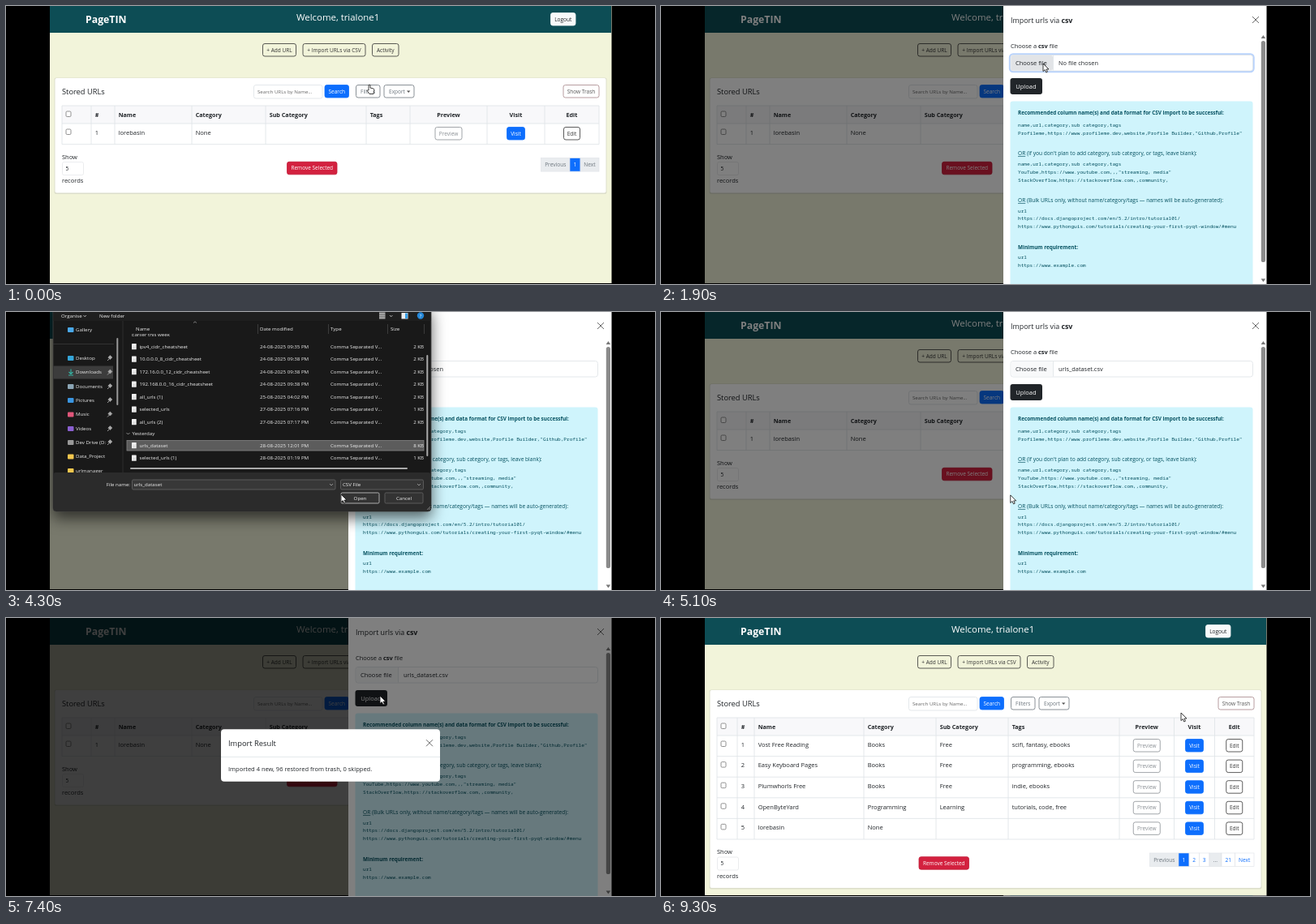
Animation, 800 px wide and 343 px high, one loop 9.4 s. Source, as an HTML page:

```html
<!DOCTYPE html>
<html lang="en">
<head>
<meta charset="utf-8">
<style>
html, body { margin: 0; width: 100%; height: 100%; overflow: hidden; background: #000; }
svg { display: block; }
text { font-family: "Open Sans", "Noto Sans", sans-serif; white-space: pre; }
.mono { font-family: "Noto Sans Mono", "DejaVu Sans Mono", monospace; }
.shadow { filter: drop-shadow(0 8px 9px rgba(0, 0, 0, .6)); }
</style>
</head>
<body>
<svg id="stage" width="800" height="343" viewBox="0 0 800 343"></svg>
<script>
const LOOP = 9400, STEP = 100;
const BLUE = '#0d6efd', INK = '#212529', GRAY = '#6c757d';

// text is placed by its vertical middle
const text = (x, cy, str, size = 7.5, fill = INK, extra = '') =>
  `<text x="${x}" y="${(cy + size * .36).toFixed(2)}" font-size="${size}" fill="${fill}" ${extra}>${str}</text>`;
const bold = (x, cy, str, size = 7.2, fill = INK, extra = '') =>
  text(x, cy, str, size, fill, 'font-weight="700" ' + extra);
const box = (x1, y1, x2, y2, fill = 'none', stroke = 'none', r = 0, extra = '') =>
  `<rect x="${x1}" y="${y1}" width="${x2 - x1}" height="${y2 - y1}" rx="${r}" fill="${fill}" stroke="${stroke}" ${extra}/>`;
const path = (d, stroke, width = 1, fill = 'none') =>
  `<path d="${d}" fill="${fill}" stroke="${stroke}" stroke-width="${width}"/>`;
const group = (id, content) => `<g id="${id}">${content}</g>`;
const MID = 'text-anchor="middle"', END = 'text-anchor="end"';
const button = (x1, y1, x2, label, color, fill = 'none', stroke = color, h = 16.5) =>
  box(x1 + .5, y1 + .5, x2 - .5, y1 + h - .5, fill, stroke, 2.5, 'stroke-width=".8"') +
  text((x1 + x2) / 2, y1 + h / 2, label, 6.5, color, MID);
const cross = (x, y) => path(`M${x - 4} ${y - 4}l8 8m0-8l-8 8`, '#6a6a6a', 1);
const checkbox = y => box(74, y - 4, 80, y + 2.5, '#fff', '#777', 1.3, 'stroke-width=".8"');

function page({ edges, rows, removeX, pager }) {
  const bottom = 145 + 25.6 * rows.length;
  const titles = ['', '#', 'Name', 'Category', 'Sub Category', 'Tags', 'Preview', 'Visit', 'Edit'];
  const mid = i => (edges[i] + edges[i + 1]) / 2;
  let s = box(54, 0, 747, 342, '#f2f4da') + box(54, 0, 746, 33, '#0d4d55') +
    bold(98, 16.5, 'PageTIN', 12.3, '#fff') + text(358, 14, 'Welcome, trialone1', 11.4, '#fff') +
    button(671, 8, 702.5, 'Logout', INK, '#f8f9fa', '#f8f9fa') +
    button(316, 46, 358, '+ Add URL', '#333') +
    button(365.5, 46, 443.5, '+ Import URLs via CSV', '#333') +
    button(451, 46, 484.5, 'Activity', '#333');
  s += box(59.5, 88.5, 740.5, bottom + 61.5, '#dcdecb', 'none', 2) +
    box(60.5, 89, 739.5, bottom + 60, '#fff', 'none', 2) +
    text(69, 106, 'Stored URLs', 9.3) +
    box(305.5, 97.5, 390, 114, '#fff', '#dee2e6', 2.5, 'stroke-width=".8"') +
    text(310, 106, 'Search URLs by Name...', 6.15, '#666') +
    button(392.5, 97, 423, 'Search', '#fff', BLUE, BLUE) +
    button(431, 97, 461.5, 'Filters', GRAY) +
    button(465.5, 97, 503.5, 'Export   ', GRAY) + path('M494 104.5h4.4l-2.2 2.4z', 'none', 0, '#555') +
    button(686.5, 97, 731.5, 'Show Trash', '#555', 'none', '#a58488');
  s += box(69, 123, 731, 145, '#f8f8fa');
  const lines = edges.map(x => `M${x} 123V${bottom}`).join('') +
    [123, 145, ...rows.map((_, i) => 170.6 + i * 25.6)].map(y => `M69 ${y}H731`).join('');
  s += path(lines, '#dee2e6', .8) + checkbox(134);
  titles.forEach((t, i) => s += i < 6 ? bold(edges[i] + 4.7, 134, t) : bold(mid(i), 134, t, 7.2, INK, MID));
  rows.forEach((cells, r) => {
    const cy = 156 + r * 25.6, top = cy - 7;
    s += checkbox(cy);
    [r + 1, ...cells].forEach((c, i) => s += text(edges[i + 1] + 4.7, cy, c));
    s += button(mid(6) - 17, top, mid(6) + 17, 'Preview', '#8a8f94') +
      button(mid(7) - 11.5, top, mid(7) + 11.5, 'Visit', '#fff', BLUE, BLUE) +
      button(mid(8) - 10.5, top, mid(8) + 10.5, 'Edit', '#333');
  });
  s += text(69, bottom + 15.3, 'Show') +
    box(69.5, bottom + 22, 95.5, bottom + 38, '#fff', '#e6e8ea', 2, 'stroke-width=".8"') +
    text(73.5, bottom + 30, '5', 6.5) + text(69, bottom + 45, 'records') +
    button(removeX, bottom + 21.2, removeX + 62.5, 'Remove Selected', '#fff', '#d3213f', '#c01c38');
  pager.forEach(([x1, x2, label, kind]) => {
    const [fill, color] = { off: ['#e9ecef', GRAY], on: [BLUE, '#fff'], link: ['#fff', BLUE] }[kind];
    s += box(x1, bottom + 17, x2, bottom + 33.5, fill, '#dee2e6', 0, 'stroke-width=".6"') +
      text((x1 + x2) / 2, bottom + 25.3, label, 6.6, color, MID);
  });
  return s;
}

function drawer() {
  const teal = '#055160';
  const note = (y, str) => text(440, y, str, 6.6, teal);
  const code = (y, ...lines) => lines.map((l, i) => text(440, y + i * 9.8, l, 6.07, teal, 'class="mono"')).join('');
  const or = '<tspan text-decoration="underline">OR</tspan>';
  return box(422, 0, 747, 343, '#fff') +
    text(431, 17.5, 'Import urls via <tspan font-weight="700">csv</tspan>', 8.9) + cross(733, 17) +
    box(723.5, 8, 742.5, 26.5, 'none', '#4a8ac0', 3, 'id="closeFocus" stroke-width="1.5"') +
    text(431, 49, 'Choose a <tspan font-weight="700">csv</tspan> file', 7.45) +
    box(430, 59.5, 730.5, 81, 'none', '#b9d3fc', 4, 'id="ring" stroke-width="2.4"') +
    box(431, 60.5, 729.5, 80, '#fff', '#dee2e6', 3, 'stroke-width=".8"') +
    box(431.5, 61, 483, 79.5, '#f8f9fa', 'none', 2, 'id="choose"') + path('M483.5 61V79.5', '#dee2e6', .8) +
    text(437, 70, 'Choose file') + text(490, 70, '', 7.4, INK, 'id="chosen"') +
    box(430.5, 89, 470, 109, INK, 'none', 3, 'id="upload"') + text(437.3, 99, 'Upload', 7.5, '#fff') +
    box(430.5, 117.5, 729.5, 350, '#cff4fc', 'none', 3) +
    bold(440, 132, 'Recommended column name(s) and data format for CSV import to be successful:', 6.33, teal) +
    code(147, 'name,url,category,sub category,tags',
      'Profileme,https://www.profileme.dev,website,Profile Builder,"Github,Profile"') +
    note(182, or + ' (If you don\'t plan to add category, sub category, or tags, leave blank):') +
    code(195, 'name,url,category,sub category,tags', 'YouTube,https://www.youtube.com,,,"streaming, media"',
      'StackOverflow,https://stackoverflow.com,,community,') +
    note(240, or + ' (Bulk URLs only, without name/category/tags — names will be auto-generated):') +
    code(252.5, 'url', 'https://docs.djangoproject.com/en/5.2/intro/tutorial01/',
      'https://www.pythonguis.com/tutorials/creating-your-first-pyqt-window/#menu') +
    bold(440, 297.5, 'Minimum requirement:', 6.33, teal) + code(310, 'url', 'https://www.example.com') +
    box(739.8, 43, 745, 316, '#8b8b8b', 'none', 2.6) +
    path('M739.6 40h5.6l-2.8-4zM739.6 336.5h5.6l-2.8 4z', 'none', 0, '#777');
}

function dialog() {
  const W = '#eee', t = (x, y, s, extra) => text(x, y, s, 6.15, W, extra);
  let s = box(58, -8, 524, 246, '#191919', '#444', 4, 'stroke-width=".8" class="shadow"') +
    box(58.5, 0, 523.5, 11, '#1f1f1f') + t(68, 4.6, 'Organise') + path('M95.5 4l1.7 1.8l1.7-1.8', W, .7) + t(115, 4.6, 'New folder') +
    box(460, .5, 467.5, 8.5, '#aaa') + path('M460 3.2h7.5m-7.5 2.7h7.5', '#444', .6) + path('M473 4l1.7 1.8l1.7-1.8', W, .7) +
    box(487.5, 1, 495.5, 8.5, '#eee') + box(492, 1.5, 495, 8, '#3aa0e8') +
    '<circle cx="511" cy="4.5" r="4.2" fill="#2487d8"/>' + text(511, 4.5, '?', 6, '#fff', MID);

  const places = [['Gallery', 22, '#4aa8e8'], ['Desktop', 57, '#35a5d8'], ['Downloads', 74.5, '#35b5a5'],
    ['Documents', 92, '#8ba5b5'], ['Pictures', 109, '#3a95e0'], ['Music', 126.5, '#e0567a'], ['Videos', 144, '#8a60d0'],
    ['Dev Drive (D:', 161, '#999'], ['Data_Project', 178.5, '#f3c74e'], ['urlmanager', 196, '#f3c74e']];
  s += box(58.5, 66.5, 132, 82.5, '#3c3c3c') + path('M58 39.5H133', '#3a3a3a', .8);
  places.forEach(([name, y, color], i) => {
    s += (name == 'Downloads' ? path(`M80 ${y - 4}v6m-2.5-2.5l2.5 2.5l2.5-2.5m-5.5 4h6`, color, 1.1)
      : box(76, y - 3, 83.5, y + 3, color, 'none', 1)) + t(86, y - .4, name);
    if (i > 0 && i < 8) s += path(`M125 ${y + 3}l2.5-2.5`, '#aaa', .9) + path(`M125.8 ${y - 1}l2.6-2.4l2.4 2.4l-2.4 2.6z`, '#aaa', .6, '#aaa');
  });
  s += box(136.3, 32, 138.3, 115, '#999', 'none', 1) + path('M144 11V198', '#333', .8);

  s += t(155, 27.6, 'Earlier this week') + box(145, 11.5, 516, 27, '#191919') + t(160, 21.1, 'Name') + t(313, 21.1, 'Date modified') +
    t(400, 21.1, 'Type') + t(474, 21.1, 'Size') + path('M310.5 15V27M397.5 15V27M470.5 15V27M515.5 15V27', '#444', .8) +
    path('M231 13.5l2-1.7l2 1.7', '#aaa', .7);
  const files = [['ipv4_cidr_cheatsheet', '24-08-2025 09:35 PM', 2], ['10.0.0.0_8_cidr_cheatsheet', '24-08-2025 09:38 PM', 2],
    ['172.16.0.0_12_cidr_cheatsheet', '24-08-2025 09:38 PM', 2], ['192.168.0.0_16_cidr_cheatsheet', '24-08-2025 09:38 PM', 2],
    ['all_urls (1)', '25-08-2025 04:02 PM', 2], ['selected_urls', '27-08-2025 07:16 PM', 1], ['all_urls (2)', '27-08-2025 07:17 PM', 2],
    ['urls_dataset', '28-08-2025 12:01 PM', 8], ['selected_urls (1)', '28-08-2025 01:19 PM', 1]];
  s += box(149, 158.5, 515, 171, '#5c5c5c', '#858585', 0, 'id="picked" stroke-width=".8"');
  files.forEach(([name, date, kb], i) => {
    const y = 42.6 + i * 15.5 + (i > 6 ? 13.5 : 0);
    s += box(155, y - 3.7, 160.7, y + 3.7, '#eee', 'none', .6) + path(`M156.3 ${y + .5}h3m-3 1.6h3`, '#bbb', .5) +
      t(164.5, y, name) + t(313, y, date) + t(400, y, 'Comma Separated V...') + t(515, y, kb + ' KB', END);
  });
  s += path('M148.5 149l2 2l2-2', '#bbb', .7) + t(155.5, 149.7, 'Yesterday') +
    box(153, 192, 495, 194, '#aaa', 'none', 1) + box(518.3, 53, 520.3, 178, '#aaa', 'none', 1);

  const field = (x1, y1, x2, y2, fill, stroke) => box(x1, y1, x2, y2, fill, stroke, 1.5, 'stroke-width=".8"');
  s += box(58.5, 198, 523.5, 245.5, '#2b2b2b', 'none', 3) + t(153, 213, 'File name:', END) +
    field(155.5, 207, 406, 219, '#383838', '#666') + t(157.5, 213, 'urls_dataset', 'id="fileName"') +
    field(412.5, 207, 514.5, 219, '#363636', '#666') + t(415, 213, 'CSV File') +
    path('M399 212l2 2l2-2M507 212l2 2l2-2', '#bbb', .7) +
    field(413, 223, 460, 236, '#333', '#cfcfcf') + t(436.5, 229.5, 'Open', MID) +
    field(467, 223, 514, 236, '#333', '#666') + t(490.5, 229.5, 'Cancel', MID) +
    path('M521 244l2-2m-4 2l4-4', '#999', .7);
  return s;
}

const modal = box(265, 139, 535, 203.5, '#fff', 'none', 4) + text(274, 156.3, 'Import Result', 9.3) +
  cross(522, 156) + path('M265 173.2H535', '#dee2e6', .8) +
  text(274, 188.3, 'Imported 4 new, 96 restored from trash, 0 skipped.');

const ARROW = 'M0 0V9.6L2.3 7.6L3.8 11L5.5 10.2L4 7H7Z';
const HAND = 'M0 .6Q1-.6 2 .6V4L6 5Q7 5.4 6.8 6.6L6 11.5H1L-1.8 7.6Q-1.7 6.3 0 7Z';
const cursor = id => group(id, path('', '#111', .8, '#fff'));

const before = page({
  edges: [69, 105, 134, 229, 320, 444, 498, 593, 664, 731], rows: [['lorebasin', 'None', '', '']], removeX: 346,
  pager: [[659.5, 695, 'Previous', 'off'], [695, 708, '1', 'on'], [708, 731, 'Next', 'off']]
});
const after = page({
  edges: [69, 94, 115, 250, 339, 428, 565, 632.5, 682.5, 731], removeX: 317.5,
  rows: [['Vost Free Reading', 'Books', 'Free', 'scifi, fantasy, ebooks'], ['Easy Keyboard Pages', 'Books', 'Free', 'programming, ebooks'],
    ['Plumwhorls Free', 'Books', 'Free', 'indie, ebooks'], ['OpenByteYard', 'Programming', 'Learning', 'tutorials, code, free'],
    ['lorebasin', 'None', '', '']],
  pager: [[602.5, 638, 'Previous', 'off'], [638, 651, '1', 'on'], [651, 663.5, '2', 'link'], [663.5, 676, '3', 'link'],
    [676, 691, '...', 'off'], [691, 707.5, '21', 'link'], [707.5, 731, 'Next', 'link']]
});
const dim = id => box(54, 0, 747, 343, '#000', 'none', 0, `id="${id}"`);

stage.innerHTML = before + dim('pageDim') + group('panel', drawer()) + dim('panelDim') + group('result', modal) +
  group('picker', dialog()) + cursor('pointer') + group('reloaded', after + cursor('pointer2')) +
  box(0, 0, 53.5, 343, '#000') + box(746.5, 0, 800, 343, '#000') + box(0, 342.3, 422, 343, '#000');

const el = id => document.getElementById(id);
const ramp = (t, a, b) => Math.min(1, Math.max(0, (t - a) / (b - a)));
const ease = p => p * p * (3 - 2 * p);
const within = (t, a, b) => t >= a && t < b;
const fade = (id, v) => el(id).setAttribute('opacity', v);
const tint = (id, c) => el(id).setAttribute('fill', c);

const TRACK = [[0, 447, 97], [400, 408, 55], [900, 408, 55], [1700, 471, 71], [2400, 471, 71], [3200, 200, 163],
  [3600, 200, 163], [4300, 413, 225], [4600, 430, 229], [5000, 430, 229], [6100, 461, 96], [7400, 461, 96], [8000, 513, 150]];
const TRACK2 = [[8200, 520, 125], [9100, 641, 117]];

function placeCursor(id, track, t, hand) {
  let [, x, y] = track[0];
  for (let i = 1; i < track.length; i++) {
    const [t0] = track[i - 1], [t1, x1, y1] = track[i], p = ease(ramp(t, t0, t1));
    x += (x1 - x) * p;
    y += (y1 - y) * p;
  }
  el(id).setAttribute('transform', `translate(${x} ${y})`);
  el(id).firstChild.setAttribute('d', hand ? HAND : ARROW);
}

function draw(t) {
  const open = ramp(t, 500, 800), shown = ramp(t, 7000, 7300), slide = ease(ramp(t, 7000, 7500));
  fade('pageDim', open * .5);
  el('panel').setAttribute('transform', `translate(${325 * (1 - ease(open))} 0)`);
  fade('panelDim', shown * .5);
  fade('result', shown);
  el('result').setAttribute('transform', `translate(0 ${-17 * (1 - slide)})`);
  fade('picker', +within(t, 2300, 4800));
  fade('picked', +(t >= 3400));
  fade('fileName', +(t >= 3400));
  el('chosen').textContent = t < 4800 ? 'No file chosen' : 'urls_dataset.csv';
  fade('ring', +within(t, 1800, 2300));
  fade('closeFocus', +(t >= 8000));
  tint('choose', within(t, 1500, 2300) ? '#e2e4e7' : '#f8f9fa');
  tint('upload', within(t, 6000, 7000) ? '#424649' : INK);
  fade('reloaded', ramp(t, 8000, 8460));
  placeCursor('pointer', TRACK, t, t < 200 || within(t, 300, 900) || within(t, 6000, 7000));
  placeCursor('pointer2', TRACK2, t, false);
}

function tick(now) {
  draw(Math.floor(now % LOOP / STEP) * STEP);
  requestAnimationFrame(tick);
}
requestAnimationFrame(tick);
</script>
</body>
</html>
```
